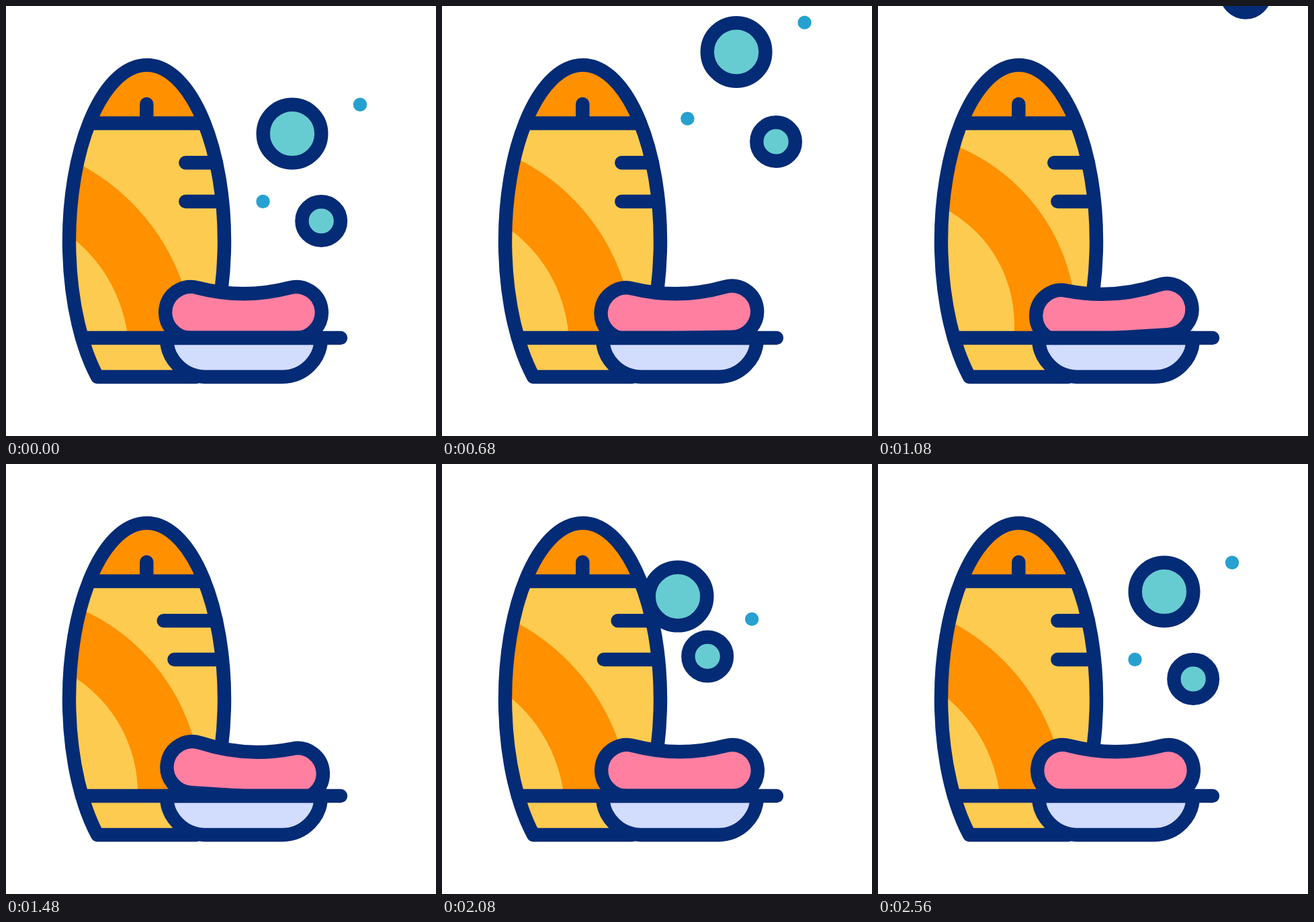
These frames come from a looping animation (640x640 px, 3 s). An HTML page:

```html
<!DOCTYPE html>
<html lang="en">
<head>
<meta charset="utf-8">
<title>Soap and bubbles</title>
<style>
  html, body { margin: 0; width: 100%; height: 100%; overflow: hidden; background: #fff; }
  svg { display: block; width: 100vw; height: 100vh; }
  .ink { stroke: #042b75; stroke-width: 20.4; stroke-linecap: round; stroke-linejoin: round; }
</style>
</head>
<body>
<svg viewBox="0 0 640 640">
  <defs>
    <path id="shell" d="M136 552A115.5 262 0 1 1 283 552Z"/>
    <clipPath id="inside"><use href="#shell"/></clipPath>
    <clipPath id="body"><rect x="94" y="174" width="231" height="320"/></clipPath>
  </defs>

  <g id="bubbles">
    <circle class="ink" r="43.3" fill="#67ccd1"/>
    <circle class="ink" r="28.8" fill="#67ccd1"/>
    <circle r="10.2" fill="#26a1cf"/>
    <circle r="10.2" fill="#26a1cf"/>
  </g>

  <g clip-path="url(#inside)">
    <rect x="80" y="80" width="260" height="480" fill="#fdcb50"/>
    <rect x="80" y="80" width="260" height="94" fill="#ff9000"/>
    <g clip-path="url(#body)"><circle id="band" fill="none" stroke="#ff9000"/></g>
  </g>
  <use href="#shell" class="ink" fill="none"/>
  <path class="ink" fill="none" d="M124 174.500H295M209.300 146V174"/>
  <path id="marks" class="ink" fill="none"/>

  <path id="soap" class="ink" fill="#ff7fa1"
    d="M276 494A38 38 0 1 1 285 419.300C330 431 377 431 422 419.300A38 38 0 1 1 431 494Z"/>
  <path class="ink" fill="#d2dcfd" d="M239 494A57.800 57.800 0 0 0 296 552H411.500A57.800 57.800 0 0 0 469 494Z"/>
  <path class="ink" fill="none" d="M113 494H498"/>
</svg>

<script>
const LOOP = 3000, STEP = 40;
const $ = id => document.getElementById(id);
const clamp = u => Math.min(1, Math.max(0, u));
const mix = (a, b, u) => a + (b - a) * u;
const smooth = (t, a, b) => {
  const u = clamp((t - a) / (b - a));
  return u * u * (3 - 2 * u);
};
const hump = (t, start, peak, end) => smooth(t, start, peak) - smooth(t, peak, end);

// rest: settled place; from, via: curve of arrival; lift, drift, bend: rise out of view
const bubbles = [
  { rest: [426, 190], from: [203, 211], lift: 1.03, drift: .0534, bend: .00038 },
  { rest: [469.2, 320], from: [249, 220], lift: 1, drift: .24, bend: -.00003 },
  { rest: [527, 146.8], from: [209, 215], via: [460, 318], lift: 1.035, drift: .074, bend: .00024 },
  { rest: [382.5, 291], from: [185, 215], lift: 1.045, drift: -.04, bend: -.0008 }
];
const dots = [...$("bubbles").children];

function arrival(t) {
  const over = Math.sin(Math.PI * clamp((t - 2360) / 200));
  return smooth(t, 1640, 2360) + .006 * over * over;
}

function place(b, t) {
  if (t < 1500) {
    const d = b.lift * .000357 * Math.max(0, t - 105) ** 2;
    return [b.rest[0] + b.drift * d + b.bend * d * d, b.rest[1] - d];
  }
  const p = arrival(t);
  return b.rest.map((end, i) => {
    const start = b.from[i];
    const via = b.via ? b.via[i] : (start + end) / 2;
    return mix(mix(start, via, p), mix(via, end, p), p);
  });
}

function set(el, attrs) {
  for (const k in attrs) el.setAttribute(k, attrs[k]);
}

function draw(t) {
  bubbles.forEach((b, i) => {
    const [cx, cy] = place(b, t);
    set(dots[i], { cx, cy });
  });

  const w = 1.065 * hump(t, 400, 1200, 1860);
  const inner = mix(224, 195, w), outer = mix(322, 287, w);
  set($("band"), {
    cx: mix(-41, 8, w), cy: mix(520, 474, w),
    r: (inner + outer) / 2, "stroke-width": outer - inner
  });

  const top = 267.3 - 35 * hump(t, 920, 1585, 2250);
  const low = 267.3 - 37 * hump(t, 1160, 1840, 2520);
  set($("marks"), { d: `M${top} 233.3H313M${low} 291H322` });

  const tilt = 4 * (-smooth(t, 520, 1000) + 2 * smooth(t, 1000, 1560) - smooth(t, 1560, 2040));
  set($("soap"), { transform: `rotate(${tilt} 353.5 491)` });
}

function tick() {
  const t = performance.now() % LOOP;
  draw(t < 120 ? 0 : Math.floor(t / STEP) * STEP);
  requestAnimationFrame(tick);
}
tick();
</script>
</body>
</html>
```
